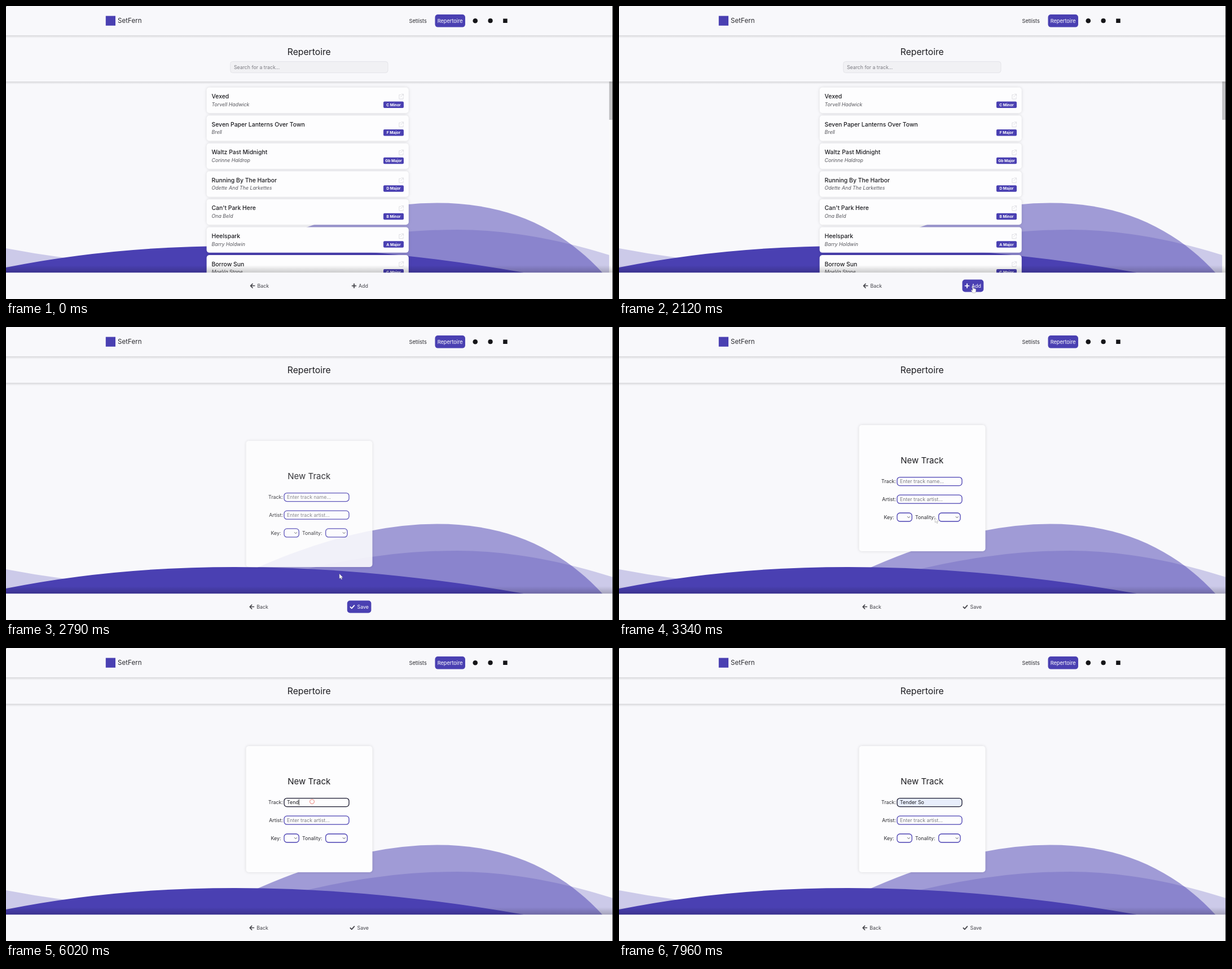
Recreate the animation shown at these times as an HTML page. Size 1076x520 px, loop 8 s.

```html
<!DOCTYPE html>
<html lang="en">
<head>
<meta charset="utf-8">
<title>Repertoire</title>
<style>
  html, body { margin: 0; width: 100%; height: 100%; overflow: hidden; background: #f8f8fb; }
  svg { display: block; width: 100%; height: 100%; }
  text { font-family: Inter, "Open Sans", sans-serif; font-size: 8.9px; fill: #2b2b30; white-space: pre; }
  .brand { font-size: 11.6px; }
  .nav { font-size: 9.2px; }
  .head { font-size: 15.7px; fill: #1c1c20; text-anchor: middle; }
  .sub { font-size: 15px; fill: #1c1c20; text-anchor: middle; }
  .hint { font-size: 8.75px; fill: #7a7a80; }
  .typed { fill: #1c1c20; }
  .song { font-size: 10.4px; font-weight: 550; fill: #1c1c20; }
  .artist { font-size: 8.8px; font-style: italic; fill: #55555b; }
  .key { font-size: 6.7px; font-weight: 700; fill: #fff; text-anchor: middle; }
  .card { fill: #fdfdfe; filter: drop-shadow(0 0 2.5px rgba(0, 0, 0, .13)); }
  .field { fill: #fdfdfe; stroke: #4a40b2; stroke-width: 1.3; }
  .line { fill: none; stroke-linecap: round; stroke-linejoin: round; }
</style>
</head>
<body>
<svg id="stage" viewBox="0 0 1076 520" preserveAspectRatio="none"></svg>
<script>
const LOOP = 8000;
const ACCENT = '#4a40b2';
const PAPER = '#f8f8fb';
const FORM_AT = 2620;
const FOCUS_AT = 4220;
const FILL_AT = 7370;
const TITLE = 'Tender So';
const KEY_TIMES = [5320, 5560, 5800, 5980];

const tracks = [
  ['Vexed', 'Torvell Hadwick', 'C Minor'],
  ['Seven Paper Lanterns Over Town', 'Brell', 'F Major'],
  ['Waltz Past Midnight', 'Corinne Haldrop', 'Gb Major'],
  ['Running By The Harbor', 'Odette And The Larkettes', 'D Major'],
  ["Can't Park Here", 'Ona Beld', 'B Minor'],
  ['Heelspark', 'Barry Holdwin', 'A Major'],
  ['Borrow Sun', 'MoeVa Stone', 'C Major']
];

// time, x, y
const pointerPath = [
  [100, 1056, 300], [670, 834.5, 331], [1250, 720, 410], [1720, 628, 497],
  [2550, 627, 497], [2790, 591, 438], [3190, 562, 345], [4000, 542.5, 273], [4220, 542.5, 273]
];

const text = (x, y, cls, str, extra = '') => `<text x="${x}" y="${y}" class="${cls}" ${extra}>${str}</text>`;
const box = (x, y, w, h, r, extra) => `<rect x="${x}" y="${y}" width="${w}" height="${h}" rx="${r}" ${extra}/>`;
const line = (d, width, extra = '') => `<path class="line" d="${d}" stroke-width="${width}" ${extra}/>`;
const purple = `fill="${ACCENT}"`;
const shade = y => box(0, y, 1075, 5, 0, 'fill="url(#down)"');

function trackCard([song, artist, key], i) {
  return `<g transform="translate(0 ${144.6 + i * 49.57})">
    ${box(355.6, 0, 358.2, 45.4, 5, 'class="card"')}
    ${text(364.5, 19.6, 'song', song)}
    ${text(364.5, 33.2, 'artist', artist)}
    ${line('M699.5 13h-2.6v7.4h7.2v-3M701 11.8h3.6v3.6M704.4 12l-4.8 4.8', 1, 'stroke="#dedee3"')}
    ${box(669, 24.9, 36, 11.5, 2, purple)}
    ${text(687, 33.1, 'key', key)}
  </g>`;
}

function select(x, w) {
  const c = x + w - 5.8;
  return box(x, 156, w, 15, 5, 'class="field"') +
    line(`M${c - 2} 162.6l2 2.1 2-2.1`, 1, 'stroke="#55555b"');
}

const backButton = x => `<g>
  ${line(`M${x + 7.5} 496.6h-7M${x + 3.7} 493.1l-3.5 3.5 3.5 3.5`, 1.5, 'stroke="#44444a"')}
  ${text(x + 12.2, 500, '', 'Back', 'style="fill:#44444a"')}
</g>`;

const actionButton = (id, x, w, icon, labelX, label) => `
  ${box(x, 485.5, w, 22, 5, `id="${id}Bg" ${purple}`)}
  <g id="${id}Ink">${line(icon, 1.8, 'stroke="currentColor"')}
  ${text(labelX, 500, '', label, 'style="fill:currentColor"')}</g>`;

const waves = `<g ${purple}>
  <path opacity=".25" d="M0 430Q52 440 105 447C230 466 400 461 545 427C640 406 720 397 800 397C890 397 985 415 1076 444V480H0Z"/>
  <path opacity=".5" d="M330 480L430 434Q615 349.5 765 349.5C890 349.5 985 395 1057 473V480Z"/>
  <path d="M0 464Q401 383.5 917 473V480H0Z"/>
</g>`;

document.getElementById('stage').innerHTML = `
<defs>
  <linearGradient id="down" x2="0" y2="1"><stop stop-opacity=".13"/><stop offset="1" stop-opacity="0"/></linearGradient>
  <linearGradient id="up" x2="0" y2="1"><stop stop-opacity="0"/><stop offset="1" stop-opacity=".2"/></linearGradient>
</defs>
${box(0, 0, 1076, 520, 0, `fill="${PAPER}"`)}
${waves}

<g id="listPage">
  ${box(1069.2, 134, 6.8, 340, 0, 'fill="#fafafb"')}
  ${box(1069.2, 134, 5.8, 68, 0, 'fill="#c1c1c3"')}
  ${tracks.map(trackCard).join('')}
  ${box(0, 52, 1075, 82, 0, `fill="${PAPER}"`)}
  ${shade(134)}
  ${text(537.3, 87, 'head', 'Repertoire')}
  ${box(397.7, 98.6, 279.3, 19.8, 4, 'fill="#f1f1f4" stroke="#e4e4e9"')}
  ${text(404, 111.9, 'hint', 'Search for a track...')}
</g>

<g id="formPage">
  <g id="form">
    ${box(425.5, 0, 224, 224, 5, 'class="card"')}
    ${text(537.3, 68.3, 'sub', 'New Track')}
    ${text(491, 103.3, '', 'Track:', 'text-anchor="end"')}
    ${box(493, 92.6, 115, 15, 5, 'id="trackField" class="field"')}
    ${text(498, 103.3, 'hint', 'Enter track name...', 'id="trackHint"')}
    ${text(498, 103.3, 'typed', '', 'id="typed"')}
    ${box(0, 94.4, .8, 11, 0, 'id="caret" fill="#111"')}
    ${text(491, 135, '', 'Artist:', 'text-anchor="end"')}
    ${box(493, 124.2, 115, 15, 5, 'class="field"')}
    ${text(498, 135, 'hint', 'Enter track artist...')}
    ${text(469.5, 166.7, '', 'Key:')}
    ${select(493, 26.3)}
    ${text(525, 166.7, '', 'Tonality:')}
    ${select(566.7, 38.3)}
  </g>
  ${box(0, 52, 1075, 47, 0, `fill="${PAPER}"`)}
  ${shade(99)}
  ${text(537.3, 81.5, 'head', 'Repertoire')}
</g>

${box(0, 0, 1075, 52.3, 0, `fill="${PAPER}"`)}
${shade(52)}
${box(176.8, 17.6, 17.2, 17.2, 0, purple)}
${text(198, 30.2, 'brand', 'SetFern')}
${text(714.5, 29.6, 'nav', 'Setlists')}
${box(760.5, 15, 53.5, 22.6, 5, purple)}
${text(787.2, 29.6, 'nav', 'Repertoire', 'text-anchor="middle" style="fill:#fff"')}
<circle cx="831.8" cy="26.2" r="4.3" fill="#151518"/>
<circle cx="858.6" cy="26.2" r="4.1" fill="#151518"/>
${box(881.2, 22.5, 7.5, 7.5, 0, 'fill="#151518"')}

${box(0, 460, 1075, 13.4, 0, 'fill="url(#up)"')}
${box(0, 473.2, 1075, 47, 0, `fill="${PAPER}"`)}
<g id="listFoot">
  ${backButton(433.3)}
  ${actionButton('add', 608.5, 37.8, 'M617 493.2v6.8M613.6 496.6h6.8', 625, 'Add')}
</g>
<g id="formFoot">
  ${backButton(432)}
  ${actionButton('save', 604.8, 42.6, 'M610.4 496.8l2.4 2.6 4.6-5.2', 622.5, 'Save')}
</g>

${box(1075, 0, 1, 520, 0, 'fill="#1c1c1e"')}
${box(0, 0, 1, 1, 0, 'fill="#55555b"')}
<g id="pointer" fill="#fff" stroke="#8a8a8a" stroke-width=".5" stroke-linejoin="round">
  <path id="arrow" d="M0 0V8.6L2 6.9L3.4 10L4.8 9.4L3.5 6.4H6.1Z"/>
  <path id="hand" d="M-.8.8Q0-.4.8.8V4.4Q1.8 3.8 2.4 4.6Q3.4 4.2 3.8 5Q5.2 4.8 5.2 6.2V9Q4.9 10.6 4.2 12H-.6Q-1.4 10.3-2.8 8.4Q-3.6 7-2.6 6.7L-.8 8Z"/>
</g>
<circle id="ring" cx="542.5" cy="272.6" r="3.9" fill="none" stroke="#ec8a80" stroke-width="1.1"/>
`;

const el = id => document.getElementById(id);
const clamp = v => Math.min(1, Math.max(0, v));
const ramp = (t, from, span) => clamp((t - from) / span);
const show = (id, on) => el(id).setAttribute('display', on ? 'inline' : 'none');

function paintAction(id, amount) {
  el(id + 'Bg').setAttribute('opacity', amount);
  const mix = (from) => Math.round(from + (255 - from) * amount);
  el(id + 'Ink').style.color = `rgb(${mix(68)},${mix(68)},${mix(74)})`;
}

function pointerAt(t) {
  const last = pointerPath.length - 1;
  let i = 0;
  while (i < last - 1 && t >= pointerPath[i + 1][0]) i++;
  const [t0, x0, y0] = pointerPath[i];
  const [t1, x1, y1] = pointerPath[i + 1];
  const k = ramp(t, t0, t1 - t0);
  const s = k * k * (3 - 2 * k);
  return [x0 + (x1 - x0) * s, y0 + (y1 - y0) * s];
}

function drawPointer(t) {
  const [x, y] = pointerAt(t);
  const overButton = t >= 1690 && t < 2660;
  show('pointer', t >= 100 && t < FOCUS_AT);
  show('arrow', !overButton);
  show('hand', overButton);
  el('pointer').setAttribute('transform', `translate(${x} ${y})`);
  show('ring', t >= 5960 && t < 6170);
}

function drawForm(t) {
  const left = (1 - ramp(t, FORM_AT, 440)) ** 4;
  el('form').setAttribute('transform', `translate(0 ${174 + 200 * left})`);
  el('form').setAttribute('opacity', 1 - .86 * left);

  const focused = t >= FOCUS_AT;
  const filled = t >= FILL_AT;
  const count = filled ? TITLE.length : KEY_TIMES.filter(k => t >= k).length;
  const typed = el('typed');
  typed.textContent = TITLE.slice(0, count);
  show('trackHint', count === 0);
  el('trackField').style.fill = filled ? '#e8eefc' : '';
  el('trackField').style.stroke = focused ? '#17162c' : '';

  const typing = t >= KEY_TIMES[0] && t < 6400;
  const blinkOn = (t - FOCUS_AT) % 1000 < 500;
  show('caret', focused && !filled && (typing || blinkOn));
  const end = count ? typed.getComputedTextLength() : 0;
  el('caret').setAttribute('x', 498 + end);
}

function draw(t) {
  const onForm = t >= FORM_AT;
  show('listPage', !onForm);
  show('listFoot', !onForm);
  show('formPage', onForm);
  show('formFoot', onForm);
  paintAction('add', ramp(t, 1690, 150));
  paintAction('save', 1 - ramp(t, 2800, 180));
  if (onForm) drawForm(t);
  drawPointer(t);
}

const start = performance.now();
function tick(now) {
  draw(Math.max(0, now - start) % LOOP);
  requestAnimationFrame(tick);
}
draw(0);
requestAnimationFrame(tick);
</script>
</body>
</html>
```
